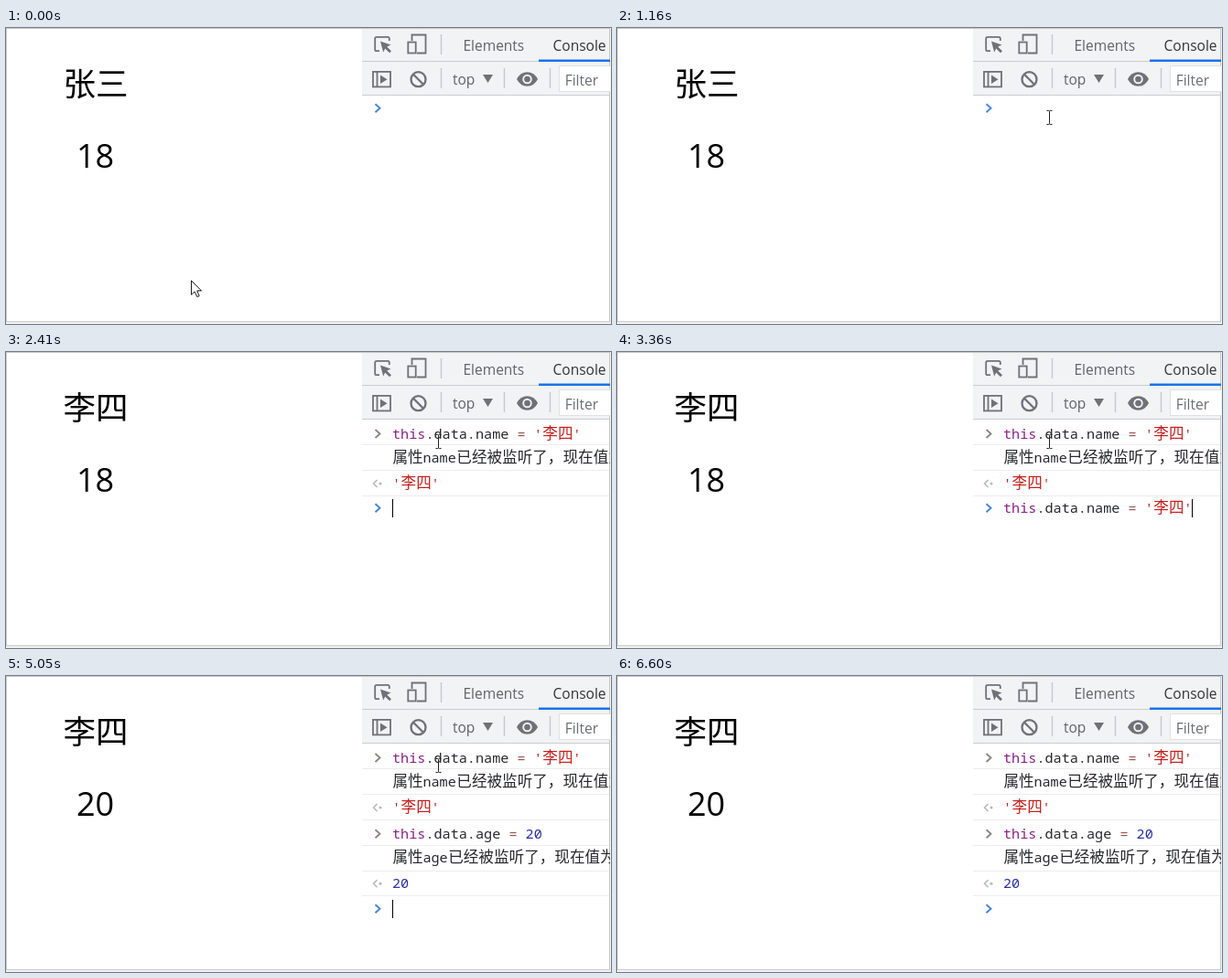
Animation of 661 by 324 pixels, one loop 6.85 s. Source, as an HTML page:

```html
<!DOCTYPE html>
<html lang="zh-CN">
<head>
<meta charset="utf-8">
<title>Console demo</title>
<style>
html, body { margin: 0; width: 100%; height: 100%; overflow: hidden; background: #fff; }
svg { display: block; }
text { white-space: pre; }
.page { font: 36px "Open Sans", "Noto Sans CJK SC", "Noto Sans CJK", sans-serif; fill: #000; }
.cjk { font-family: "Noto Sans CJK SC", "Noto Sans CJK", sans-serif; }
.page.cjk { font-size: 35.5px; }
.ui { font: 15.5px "Open Sans", "Noto Sans", sans-serif; fill: #5f6368; }
.code { font: 15.17px "Noto Sans Mono", "DejaVu Sans Mono", monospace; }
.code .cjk { font-size: 16.6px; font-weight: 300; }
.icon { fill: none; stroke: #6e7276; stroke-width: 1.8; }
.solid { fill: #6e7276; stroke: none; }
</style>
</head>
<body>
<svg width="661" height="324" viewBox="0 0 661 324">
  <defs><clipPath id="view"><rect width="660" height="322"/></clipPath></defs>
  <rect width="661" height="324" fill="#f2f2f2"/>
  <rect width="660" height="322" fill="#fff"/>
  <text id="name" class="page cjk" x="62.5" y="73.5"></text>
  <text id="age" class="page" x="97.5" y="153" text-anchor="middle"></text>
  <path d="M0 .5H660M.5 0V322M659.5 0V322M0 321.5H660" stroke="#c9c9c9" fill="none"/>

  <g clip-path="url(#view)">
    <rect x="389" y="1" width="270" height="72" fill="#f1f3f4"/>
    <path d="M389 36.5H660M389 73.5H660" stroke="#cacdd1"/>
    <rect x="582" y="34.5" width="78" height="2.5" fill="#1a73e8"/>
    <path d="M475.5 7V29M475.5 44V66M544.5 44V66M594.5 44V66" stroke="#c6c9cd" stroke-width="1.4"/>
    <rect x="604.5" y="41.5" width="60" height="28" fill="#fff" stroke="#dfe1e4"/>
    <text class="ui" x="499.5" y="25">Elements</text>
    <text class="ui" x="597.5" y="25" style="fill:#333">Console</text>
    <text class="ui" x="488" y="62">top</text>
    <text class="ui" x="610.7" y="62.5" style="fill:#6a6e72">Filter</text>
    <g class="icon">
      <path d="M408 25.2H405Q403.2 25.2 403.2 23.4V11.6Q403.2 9.8 405 9.8H417Q418.8 9.8 418.8 11.6V14"/>
      <path class="solid" d="M409 14.5L420.5 18.5L416.2 20.5L421 25.3L419 27.2L414.2 22.5L412.2 26.5Z"/>
      <path d="M443.5 14V7.5H458.5V27.5H449"/>
      <rect x="439.3" y="15.5" width="8.4" height="12"/>
      <rect x="401" y="47.9" width="19" height="16.5"/>
      <path d="M405.5 48V64.5"/>
      <path class="solid" d="M409 51.5L416.5 56.2L409 61Z"/>
      <circle cx="450.5" cy="56.2" r="8" stroke-width="2.3"/>
      <path d="M444.8 50.5L456.2 62" stroke-width="2.3"/>
      <path class="solid" d="M521 51H532L526.5 60Z"/>
      <path class="solid" d="M558 56Q562 48.3 569.5 48.3T581 56Q577 63.7 569.5 63.7T558 56Z"/>
      <circle cx="569.5" cy="56" r="4.3" stroke="#f1f3f4" stroke-width="1.9"/>
    </g>
    <g id="rows"></g>
    <g id="prompt"></g>
    <rect id="caret" width="1" height="20" fill="#000"/>
  </g>

  <path id="arrow" d="M.5 .5V16L4.2 12.6L6.8 18.3L9.2 17.2L6.7 11.7H11.5Z" fill="#fff" stroke="#1b1b2c" stroke-linejoin="round"/>
  <path id="beam" d="M-3 -7.5H-1Q0 -7.5 0 -6.5Q0 -7.5 1 -7.5H3M0 -6.5V6.5M-3 7.5H-1Q0 7.5 0 6.5Q0 7.5 1 7.5H3" fill="none" stroke="#222"/>
</svg>
<script>
const LOOP = 6850, LEFT = 422, CHAR = 9.1, HAN = 16.7;
const PURPLE = "#8b1f88", RED = "#c41f1c", BLUE = "#2a2fa4", INK = "#26272a", OP = "#8f5a50";
const $ = id => document.getElementById(id);

// Runs are [text, colour]; Chinese characters are wider than Latin ones.
const isHan = s => /[^\x00-\x7f]/.test(s);
const widthOf = s => s.length * (isHan(s) ? HAN : CHAR);

function line(y, runs) {
  let x = LEFT;
  const spans = runs.map(([s, fill]) => {
    const han = isHan(s);
    const span = `<tspan x="${(x + (han ? .5 : 0)).toFixed(1)}" fill="${fill}"${han ? ' class="cjk"' : ""}>${s}</tspan>`;
    x += widthOf(s);
    return span;
  });
  return `<text class="code" y="${Math.round(y)}">${spans.join("")}</text>`;
}

const quoted = s => [["'", RED], [s, RED], ["'", RED]];
const assign = (key, value) =>
  [["this", PURPLE], [`.data.${key} `, INK], ["= ", OP], ...value];
const log = key => [["属性", INK], [key, INK], ["已经被监听了\uff0c现在值为", INK]];

const chevron = (y, color) =>
  `<path d="M403.5 ${y - 4.5}L408.5 ${y}L403.5 ${y + 4.5}" fill="none" stroke="${color}" stroke-width="1.9"/>`;
const reply = y =>
  `<path d="M405.5 ${y - 4}L401.5 ${y}L405.5 ${y + 4}" fill="none" stroke="#b4b7ba" stroke-width="1.5"/>` +
  `<circle cx="409" cy="${y}" r="1.5" fill="#b4b7ba"/>`;
const rule = y => `<path d="M389 ${Math.round(y) + .5}H659" stroke="#ececec"/>`;

// One command with its log line and its result, starting at height y.
const entry = (y, key, value) =>
  chevron(y + 15.5, "#8a8683") + line(y + 21, assign(key, value)) + rule(y + 27.4) +
  line(y + 47, log(key)) + rule(y + 55.4) +
  reply(y + 70) + line(y + 75, value) + rule(y + 83.2);

const NAME = quoted("李四"), AGE = [["20", BLUE]];
const first = entry(74, "name", NAME);
const both = first + entry(157.2, "age", AGE);

// [start, rows, prompt top, typed runs, name, age]
const states = [
  [0, "", 78, [], "张三", "18"],
  [1330, "", 78, assign("name", NAME), "张三", "18"],
  [2410, first, 161, [], "李四", "18"],
  [3360, first, 161, assign("name", NAME), "李四", "18"],
  [3810, first, 161, assign("age", AGE), "李四", "18"],
  [5050, both, 245, [], "李四", "20"]
];
const blinks = [[630, 1160], [1330, 1860], [2330, 2880], [3360, 4290], [4820, 5610], [6140, 6600]];

// Pointer stops: [start, x, y, shape]
const stops = [
  [0, 202, 276, "arrow"], [70, 208, 270, "arrow"], [150, 248, 238, "arrow"],
  [230, 330, 182, "arrow"], [310, 412, 130, "arrow"], [380, 458, 105, "arrow"],
  [460, 472.5, 98, "beam"], [5910, 471, 112, "beam"], [5990, 450, 166, "beam"],
  [6060, 404, 258, "arrow"], [6140, 355, 311, "arrow"], [6220, 0, 0, "none"]
];

const at = (list, t) => list.filter(item => item[0] <= t).pop();
let shown;

function draw(t) {
  const state = at(states, t);
  const [, rows, top, runs, name, age] = state;
  if (state !== shown) {
    shown = state;
    $("name").textContent = name;
    $("age").textContent = age;
    $("rows").innerHTML = rows;
    $("prompt").innerHTML = chevron(top + 9.7, "#4583d8") + line(top + 15, runs);
    const end = LEFT + runs.reduce((sum, run) => sum + widthOf(run[0]), 0);
    $("caret").setAttribute("x", Math.floor(end));
    $("caret").setAttribute("y", top);
  }
  const on = blinks.some(([a, b]) => t >= a && t < b);
  $("caret").style.display = on ? "" : "none";
  const [, x, y, shape] = at(stops, t);
  for (const id of ["arrow", "beam"]) {
    $(id).style.display = id === shape ? "" : "none";
    $(id).setAttribute("transform", `translate(${x} ${y})`);
  }
}

const start = performance.now();
function tick() {
  draw((performance.now() - start) % LOOP);
  requestAnimationFrame(tick);
}
tick();
</script>
</body>
</html>
```
